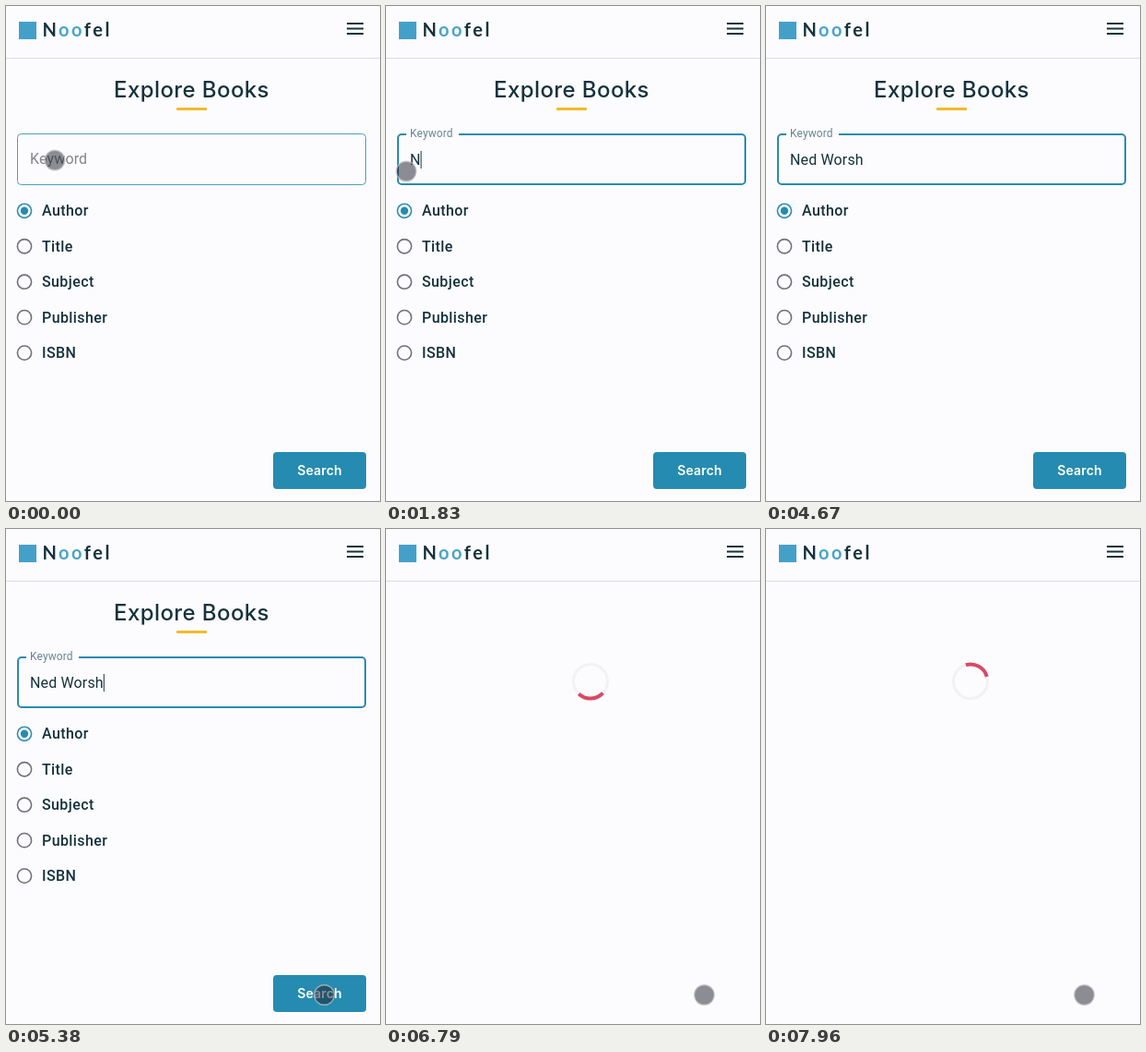
These frames come from a looping animation (406x536 px, 8 s). An HTML page:

```html
<!DOCTYPE html>
<html lang="en">
<head>
<meta charset="utf-8">
<title>Explore Books</title>
<style>
  html, body { margin: 0; width: 100%; height: 100%; overflow: hidden; background: #fcfcff; }
  svg { display: block; width: 406px; height: 536px; }
  text { white-space: pre; fill: #15323c; font-family: Roboto, sans-serif; font-size: 16px; }
  .brand { font: 700 20px Lato, sans-serif; letter-spacing: 2.5px; }
  .brand tspan { fill: #4aa4c8; }
  .title { font: 500 24px Inter, sans-serif; letter-spacing: .4px; text-anchor: middle; }
  .option { font-weight: 500; letter-spacing: .4px; }
  .label { letter-spacing: .15px; }
  .button { font: 600 14px Inter, sans-serif; letter-spacing: .2px; fill: #fff; text-anchor: middle; }
</style>
</head>
<body>
<svg viewBox="0 0 406 536">
  <rect width="406" height="536" fill="#fcfcff"/>
  <rect y="56" width="406" height="1" fill="#dadaf0"/>
  <rect x="14" y="17" width="19" height="19" fill="#44a0c8"/>
  <text class="brand" x="39.5" y="33">N<tspan>oo</tspan>fel</text>
  <path d="M370 19h18M370 24.5h18M370 30h18" stroke="#15323c" stroke-width="2"/>

  <g id="form">
    <text class="title" x="201.5" y="99">Explore Books</text>
    <rect x="185" y="110" width="33" height="3" rx="1" fill="#f5b929"/>
    <rect id="box" fill="none"/>
    <rect id="notch" x="22" y="137" height="4" fill="#fcfcff"/>
    <text id="label" class="label">Keyword</text>
    <text id="typed" class="label" x="26" y="172"></text>
    <rect id="caret" y="157" width="1" height="19" fill="#15323c"/>
    <g id="options"></g>
    <rect x="290" y="483" width="101" height="40" rx="4" fill="#268bb0"/>
    <text class="button" x="340.5" y="508">Search</text>
  </g>

  <g id="spinner" fill="none" stroke-width="4">
    <circle cx="222" cy="165" r="18.5" stroke="#f2f2f4" stroke-width="3"/>
    <path id="arc" d="M208.9 151.9A18.5 18.5 0 0 1 235.1 151.9" stroke="#d84a66"/>
  </g>

  <circle id="pointer" r="10.8" fill="#1c1c28" fill-opacity=".5" stroke="#c4c4c4" stroke-opacity=".7" stroke-width="1.4"/>
</svg>
<script>
const LOOP = 8000, FOCUS = 900, SUBMIT = 5790;
const NAME = 'Ned Worsh';
const KEYS = [1830, 2080, 2400, 2750, 3190, 3380, 3810, 4000, 4190];
const $ = id => document.getElementById(id);
const clamp = v => Math.max(0, Math.min(1, v));
const mix = (a, b, p) => a + (b - a) * p;
const easeOut = p => 1 - Math.pow(1 - clamp(p), 3);

function set(id, attrs) {
  for (const key in attrs) $(id).setAttribute(key, attrs[key]);
}
const show = (id, on) => set(id, { visibility: on ? 'inherit' : 'hidden' });

$('options').innerHTML = ['Author', 'Title', 'Subject', 'Publisher', 'ISBN'].map((name, i) => {
  const y = 221.8 + i * 38.45;
  const ring = i ? '#70707a' : '#2f8eb0';
  const dot = i ? '' : `<circle cx="20" cy="${y}" r="4.2" fill="#268bb0"/>`;
  return `<circle cx="20" cy="${y}" r="7.6" fill="none" stroke="${ring}" stroke-width="1.6"/>${dot}` +
    `<text class="option" x="39" y="${y + 5.5}">${name}</text>`;
}).join('');

function drawField(t) {
  const focused = t >= FOCUS;
  const p = easeOut((t - FOCUS) / 200);
  const w = focused ? 2 : 1;
  set('box', {
    x: 12 + w / 2, y: 138 + w / 2, width: 379 - w, height: 56 - w, rx: 4,
    stroke: focused ? '#2a8bb0' : '#4aa0b8', 'stroke-width': w
  });
  set('notch', { width: 57 * p });
  set('label', {
    transform: `translate(26 ${mix(171, 142, p)}) scale(${mix(1, .75, p)})`,
    style: `fill:${focused ? '#6a8490' : '#83838a'}`
  });

  const count = KEYS.filter(k => k <= t).length;
  const text = NAME.slice(0, count);
  if ($('typed').textContent !== text) $('typed').textContent = text;
  set('caret', { x: 26 + (count ? $('typed').getComputedTextLength() : 0) });
  const blinkOff = (t >= 1375 && t < KEYS[0]) || (t >= 4640 && t < 5130);
  show('caret', focused && !blinkOff);
}

function drawPointer(t) {
  let pos = null, alpha = 1;
  if (t < 1420) {
    pos = [53, 167];
    alpha = 1 - clamp((t - 1330) / 90);
  } else if (t >= 1580 && t < 4650) {
    pos = t < 1830 ? [21, 181] : [22, 179];
  } else if (t >= 5000) {
    const p = easeOut((t - 5250) / 130);
    pos = [mix(342, 345.5, p), mix(525, 504.5, p)];
    alpha = clamp((t - 4960) / 130);
  }
  show('pointer', pos);
  if (pos) set('pointer', { cx: pos[0], cy: pos[1], opacity: alpha });
}

function draw(t) {
  const loading = t >= SUBMIT;
  show('form', !loading);
  show('spinner', loading);
  drawField(t);
  set('arc', { transform: `rotate(${(t - 5800) * .18} 222 165)` });
  drawPointer(t);
}

const start = performance.now();
function frame(now) {
  draw(Math.max(0, now - start) % LOOP);
  requestAnimationFrame(frame);
}
draw(0);
requestAnimationFrame(frame);
</script>
</body>
</html>
```
